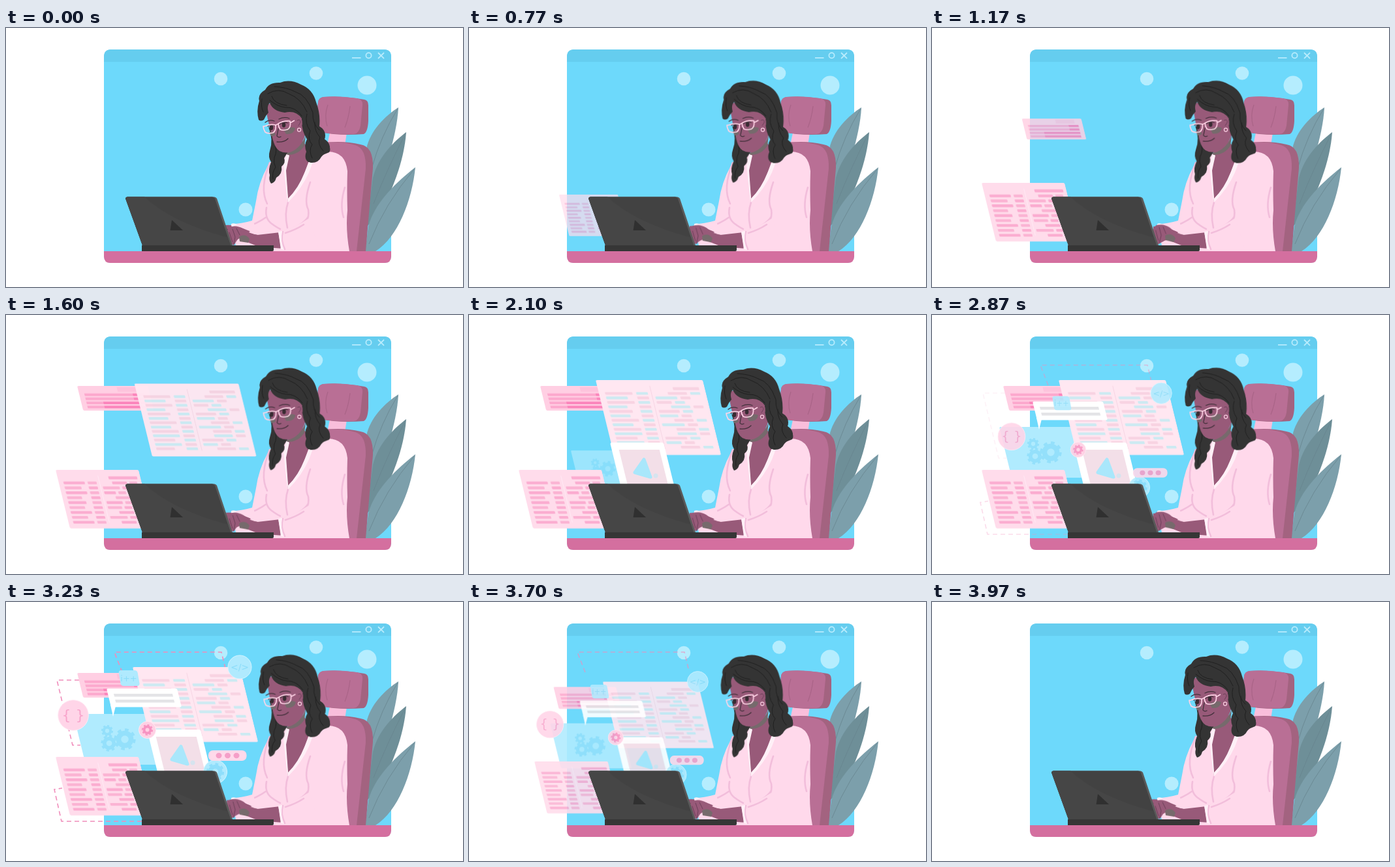
An HTML page that plays this animation: 700 px wide and 398 px high, repeating every 4010 ms.

```html
<!DOCTYPE html>
<html lang="en">
<head>
<meta charset="utf-8">
<title>Working at a laptop</title>
<style>
html, body { margin: 0; width: 100%; height: 100%; overflow: hidden; background: #fff; }
svg { display: block; width: 100vw; height: 100vh; --loop: 4010ms; --sine: cubic-bezier(.364, 0, .636, 1); }
.skin { fill: #985a79; }
.shade { fill: #766a6c; }
.hair { fill: #343434; }
.shirt { fill: #ffd9eb; }
.fold { fill: none; stroke: #f2bedb; stroke-width: 2.6; stroke-linecap: round; stroke-linejoin: round; }
.strand { fill: none; stroke: #202020; stroke-width: 1; stroke-linecap: round; }
.ink { fill: none; stroke: #41303a; stroke-width: 1.3; stroke-linecap: round; }
.frame { fill: none; stroke: #ffd3e6; stroke-width: 1.7; stroke-linejoin: round; }
.finger { fill: none; stroke: #6c4059; stroke-width: 1; stroke-linecap: round; }
.vein { fill: none; stroke: #67848e; stroke-width: .8; }
.dash { fill: none; stroke: #f08dbb; stroke-width: 1.6; stroke-dasharray: 7 5; }
.dot { fill: #b5edfe; }
.sign { font-family: "DejaVu Sans", sans-serif; text-anchor: middle; }
#cards g { transform-box: view-box; }
#cards > g { transform-origin: 290px 300px; }
#head { transform-origin: 450px 188px; animation: nod calc(var(--loop) / 4) var(--sine) infinite alternate; }
#nearHand { transform-origin: 385px 322px; animation: tap calc(var(--loop) / 24) var(--sine) infinite alternate; }
#farHand { animation: press calc(var(--loop) / 24) var(--sine) infinite alternate; }
@keyframes nod { to { transform: rotate(2deg); } }
@keyframes tap { to { transform: rotate(4deg); } }
@keyframes press { to { transform: translate(3px, 2px); } }
</style>
</head>
<body>
<svg viewBox="0 0 700 398" xmlns="http://www.w3.org/2000/svg">
  <g id="window">
    <rect x="150" y="33" width="440" height="328" rx="11" fill="#6dd9fb"/>
    <path d="M150 52V44q0-11 11-11H579q11 0 11 11V52z" fill="#65cdef"/>
    <path d="M150 343H590V351q0 10-10 10H160q-10 0-10-10z" fill="#d46f9f"/>
    <g fill="none" stroke="#b8ecfd" stroke-width="1.800">
      <path d="M530 45.800H543.500M570 38l9 8.800M579 38l-9 8.800"/>
      <circle cx="555.500" cy="42.300" r="4.100"/>
    </g>
    <circle class="dot" cx="329" cy="78" r="10.300"/>
    <circle class="dot" cx="475" cy="69.500" r="10.300"/>
    <circle class="dot" cx="553" cy="88" r="14.500"/>
    <circle class="dot" cx="367" cy="279" r="10.500"/>
  </g>

  <g id="lines">
    <path class="dash" d="M208 337H85L74 288 86 286"/>
    <path class="dash" d="M112 120H78L102 220H114"/>
    <path class="dash" d="M178 108L166 77H330L336 102"/>
  </g>
  <g id="cards"></g>

  <g id="plant">
    <path d="M601 122C582 134 557 158 552 186L549 275 562 262C578 226 599 166 601 122z" fill="#7c9fab"/>
    <path class="vein" d="M600 124Q574 166 560 216"/>
    <path d="M613 160C596 173 570 197 562 230L552 306 572 285C590 254 610 205 613 160z" fill="#6e8f98"/>
    <path class="vein" d="M612 162Q584 216 563 270"/>
    <path d="M627 214C612 226 566 262 555 305L550 343H566C600 322 622 265 627 214z" fill="#7c9fab"/>
    <path class="vein" d="M626 216Q580 270 556 332"/>
  </g>

  <g id="chair">
    <path d="M496 161H522L519 180H492z" fill="#f9bedb"/>
    <path d="M486 106Q515 104 549 110Q555 111 555 119V143Q554 160 548 163Q510 166 482 160Q474 158 475 150L478 114Q479 107 486 106z" fill="#a36380"/>
    <path d="M486 106Q511 104 537 108Q547 109 546 119L543 150Q541 162 533 163Q505 164 482 160Q474 158 475 150L478 114Q479 107 486 106z" fill="#b96f95"/>
    <path d="M493 118Q487 134 492 151M527 120Q525 138 519 153" fill="none" stroke="#a96487" stroke-width="1.200"/>
    <path d="M480 177Q515 172 543 179Q563 182 562 215L551 343H500V220z" fill="#a36380"/>
    <path d="M480 177Q512 173 535 180Q552 185 551 216L537 343H490V220z" fill="#b96f95"/>
  </g>

  <g id="body">
    <path class="shirt" d="M430 193Q408 199 401 212Q387 237 383 266L377 296Q360 301 346 301Q343 303 346 307L352 334 400 343H526Q520 309 523 280Q522 250 523 220Q520 190 493 190L474 188z"/>
    <path class="fold" d="M404 207Q388 246 400 270M399 276Q396 292 406 300Q414 306 420 309M398 291Q386 300 365 307M466 237Q456 266 463 279Q466 300 447 307M463 290Q453 305 427 312M432 268Q426 285 431 307M519 245Q511 271 517 291"/>
    <path class="skin" d="M432 185L428 216 432 267Q448 246 458 221L469 190 452 172z"/>
    <path d="M430 193L425 211 431 267 432 261 429 219 434 196zM470 191L457 223Q448 246 432 262V268Q453 247 464 222L476 190z" fill="#fff0f7"/>
    <path class="shade" d="M429 192Q447 190 459 166L457 181Q448 195 431 195z"/>
  </g>

  <g id="head">
    <path class="hair" d="M402 152Q410 172 404 189Q401 198 406 206Q401 218 404 226Q402 234 406 239Q412 238 414 230Q424 224 422 213Q429 207 426 200L432 190 414 160z"/>
    <path class="strand" d="M410 174Q417 188 411 199Q409 207 413 214Q407 222 409 232"/>
    <path class="skin" d="M397 118Q401 145 407 163Q410 183 419 189Q431 195 443 187Q456 177 459 161L462 130 438 108z"/>
    <path class="shade" d="M425 156Q438 150 443 154Q441 164 429 163zM403 160Q410 159 413 163Q411 167 406 166z"/>
    <path class="hair" d="M387 141Q383 127 388 112Q385 102 397 95Q403 83 420 84Q435 78 452 87Q470 94 475 114Q482 132 480 151Q492 158 488 171Q500 184 495 191L478 198Q472 207 463 206Q456 201 460 190Q456 180 461 171Q452 157 453 139Q444 126 427 130Q409 128 404 115Q399 120 402 130Q398 134 395 141Q390 144 387 141z"/>
    <path class="hair" d="M473 150Q490 159 488 171Q499 178 495 190Q488 192 483 198Q478 208 467 207Q457 204 460 194z"/>
    <path class="strand" d="M401 101Q417 91 433 101Q452 108 461 129M404 111Q416 121 428 122Q443 121 453 135M411 90Q430 91 443 98Q461 103 470 130Q469 147 480 157M392 109Q390 121 394 129M407 105Q411 117 430 119M461 132Q457 146 466 158Q461 171 469 179Q463 188 469 200M473 145Q472 158 481 168Q476 178 486 189"/>
    <path class="skin" d="M443 142Q446 134 452 138Q457 149 449 156Q444 157 443 150z"/>
    <path class="finger" d="M446 142Q451 139 451 145L448 150"/>
    <circle cx="449" cy="156.500" r="2.600" fill="none" stroke="#ffd3e6" stroke-width="1.100"/>
    <ellipse cx="406.500" cy="153" rx="2.800" ry="4" fill="#382b32"/>
    <ellipse cx="425.500" cy="148.800" rx="2.800" ry="4" fill="#382b32"/>
    <path class="ink" d="M401 151Q406 147 411 150M419 148Q425 143 431 146"/>
    <path class="ink" d="M397 145Q403 140 411 143M418 140Q426 136 434 139" stroke-width="2"/>
    <path class="ink" d="M417 155L415 166Q417 169 421 167M415 175Q426 176 432 170"/>
    <path class="frame" d="M396 151Q404 147 413 149Q414 158 409 161Q401 163 397 160Q394 155 394 151zM417 147Q425 142 435 143Q437 153 431 156Q424 158 420 156Q417 152 417 147zM413 150Q415 147 417 148M435 146L442 142"/>
  </g>

  <g id="farHand">
    <path class="skin" d="M336 303Q347 302 357 306Q367 307 374 312L366 320 353 325 342 331 336 325z"/>
    <path class="finger" d="M344 306L352 316M339 309L348 320"/>
  </g>
  <path class="shirt" d="M346 301Q344 304 347 307Q358 305 368 310L386 317 379 298Q360 304 346 301z"/>
  <path d="M345 301Q349 299 354 302Q350 304 346 306z" fill="#fff0f7"/>
  <path class="skin" d="M362 309Q373 317 385 318L420 314 424 339Q397 337 382 334L362 326z"/>
  <path class="shirt" d="M417 313Q441 308 465 292L480 343H420L421 336z"/>
  <path class="fold" d="M424 313Q420 325 427 340M428 315Q444 310 456 302"/>
  <path d="M417 313L423 312Q420 327 426 341L421 340z" fill="#fff0f7"/>
  <g id="nearHand">
    <path class="skin" d="M386 318Q372 316 363 308Q352 302 342 306L338 313 343 331 349 334 354 326 359 321 371 324 381 330z"/>
    <path class="shade" d="M357 321Q366 315 373 324L371 330 358 328z"/>
    <path class="finger" d="M347 309L351 321 349 332M353 308L358 318M342 314L347 329"/>
  </g>

  <g id="laptop">
    <path d="M186 259.500H319Q322 260 323 262L347 334H209L183 262Q183 260 186 259.500z" fill="#5a5a5a"/>
    <path d="M186 259.500H316Q319 260 320 262L344 334H209L183 262Q183 260 186 259.500z" fill="#424242"/>
    <path d="M186 259.500H212Q254 299 340 322L344 334H209L183 262z" fill="#464646"/>
    <path d="M254 295L271 311H251.500z" fill="#303030"/>
    <path d="M208 334H410V341Q410 343 408 343H208z" fill="#363636"/>
  </g>
</svg>
<script>
const LOOP = 4010, ENTER = 500, LEAVE = [3570, 3960];
const EASE_OUT = "cubic-bezier(.333, .667, .667, 1)";
const EASE_IN = "cubic-bezier(.333, 0, .667, .333)";
const SLANT = 13.75;
const $ = id => document.getElementById(id);

const rect = (x, y, w, h, fill, r = 0) =>
  `<rect x="${x}" y="${y}" width="${w}" height="${h}" rx="${r}" fill="${fill}"/>`;
const disc = (x, y, r, fill) => `<circle cx="${x}" cy="${y}" r="${r}" fill="${fill}"/>`;
const slanted = (x, y, inner) =>
  `<g transform="translate(${x} ${y}) skewX(${SLANT})">${inner}</g>`;
const sign = (x, y, size, fill, text) =>
  `<text class="sign" x="${x}" y="${y}" font-size="${size}" fill="${fill}">${text}</text>`;
const gear = (x, y, r, color) => `<g fill="none" stroke="${color}">
  <circle cx="${x}" cy="${y}" r="${r * .58}" stroke-width="${r * .46}"/>
  <circle cx="${x}" cy="${y}" r="${r * .88}" stroke-width="${r * .26}" pathLength="16" stroke-dasharray="1 1"/></g>`;
const badge = (x, y, r, fill, edge) =>
  `<circle cx="${x}" cy="${y}" r="${r}" fill="${fill}" stroke="${edge}" stroke-width="1"/>`;

function codeCard(x, y, w, h, o) {
  const k = w / 129, left = [33, 26, 33, 23, 28, 24, 33, 25, 33];
  const indent = [16, 0, 0, 16, 0, 0, 16, 0, 16], right = [23, 26, 18, 23, 25, 22, 23, 27, 23];
  let s = rect(0, 0, w, h, o.fill, 2) + rect(63 * k, 9, 1, h - 18, o.rule);
  s += rect(o.head[0], o.head[1], o.head[2], 4.5, o.colors[0], 1);
  for (let i = 0; i < o.rows; i++) {
    const j = i % 9, yy = o.top + i * o.pitch, start = 67 + indent[j];
    const bar = (a, len, n) =>
      rect(a * k, yy, len * k, 4.2, o.colors[(i + n) % o.colors.length], 1);
    s += bar(7.4, left[j], 0) + bar(45, 14, 1);
    s += bar(start, right[j], 0) + bar(start + right[j] + 4, 12, 1);
  }
  return slanted(x, y, s);
}

function barCard() {
  let s = rect(0, 0, 108, 38, "#ffcfe3", 2) + rect(60, 2, 34, 7, "#fdc3dc");
  [74, 74, 26, 26].forEach((split, i) => {
    const y = 11.5 + i * 6.3;
    s += rect(8, y, split, 4, "#fca8cd") + rect(8 + split, y, 92 - split, 4, "#fb84bb");
  });
  return slanted(109, 109, s);
}

const panel = slanted(103, 172, rect(0, 0, 122, 78, "#b0ebfe", 2)) +
  gear(155, 198, 9, "#94e0fb") + gear(158, 217, 12.5, "#94e0fb") + gear(182, 211, 16.5, "#94e0fb");

const photo = slanted(216, 196, rect(0, 0, 82, 80, "#fff", 3) + rect(11, 11, 62, 60, "#f3dfe8")) +
  `<path d="M268 222L278 249 254 242z" fill="#a9e7fb" stroke="#a9e7fb" stroke-width="5" stroke-linejoin="round"/>` +
  disc(286, 247, 3.5, "#d5e4ef");

const bubble = slanted(154, 133,
    rect(0, 0, 108, 28.5, "#fff", 2) + rect(9, 8, 90, 4.5, "#e4e4e7") + rect(9, 17, 90, 4.5, "#e4e4e7")) +
  `<path d="M160 158L164 176 168 160z" fill="#fff"/>`;

const smallParts =
  badge(103, 174, 23.3, "#ffd5e8", "#ffe9f3") + sign(103, 181, 22, "#f8a4cb", "{ }") +
  badge(358, 100, 18, "#b0eafe", "#d3f4ff") + sign(358, 105, 14, "#8bdcf9", "&lt;/&gt;") +
  `<g transform="translate(172 105) skewX(10)">${rect(0, 0, 29, 24, "#b0eafe", 4)}</g>` +
  sign(188, 122, 13, "#8bdcf9", "i++") +
  badge(216.500, 196.500, 13, "#ffd0e4", "#ffe9f3") + gear(216.500, 196.500, 8.500, "#f794c2") +
  badge(320.500, 261, 18, "#b0eafe", "#d3f4ff") + gear(320.500, 261, 13.500, "#8fdefb") +
  rect(310, 228, 58.500, 16, "#ffd9ea", 7) +
  [326, 339.500, 353].map(x => `<ellipse cx="${x}" cy="236" rx="4.500" ry="4.200" fill="#f59fc8"/>`).join("");

// Keys are [time, state, easing to the next key].
function play(el, keys) {
  const frames = keys.map(([time, state, easing = "linear"]) =>
    ({ ...state, easing, offset: time / LOOP }));
  el.animate(frames, { duration: LOOP, iterations: Infinity });
}

function addCard(start, html) {
  const g = document.createElementNS("http://www.w3.org/2000/svg", "g");
  const none = { transform: "scale(0)", opacity: 0 }, full = { transform: "scale(1)", opacity: 1 };
  g.innerHTML = html;
  $("cards").append(g);
  play(g, [[0, none], [start, none, EASE_OUT], [start + ENTER, full],
    [LEAVE[0], full, EASE_IN], [LEAVE[1], none], [LOOP, none]]);
}

// From back to front, each with its entry time.
addCard(870, barCard());
addCard(1867, panel);
addCard(1183, codeCard(194, 100, 164, 115, {
  fill: "#ffe7f1", rule: "#f6d5e3", head: [115, 11, 40], top: 18.5, pitch: 6.87, rows: 13,
  colors: ["#f8d3e2", "#cdeaf2"] }));
addCard(540, codeCard(76, 238, 127, 90, {
  fill: "#ffdceb", rule: "#ffe9f3", head: [78, 10, 44], top: 18, pitch: 7.55, rows: 9,
  colors: ["#fbacd0", "#fbb3d3"] }));
addCard(2193, bubble);
addCard(1530, photo);
addCard(2530, smallParts);

const fades = [[2760, 3300, 3600], [2830, 3380, 3700], [2700, 3570, 3950]];
[...$("lines").children].forEach((line, i) => {
  const [enter, leave, end] = fades[i], off = { opacity: 0 }, on = { opacity: 1 };
  play(line, [[0, off], [enter, off], [enter + 350, on], [leave, on], [end, off], [LOOP, off]]);
});
</script>
</body>
</html>
```
